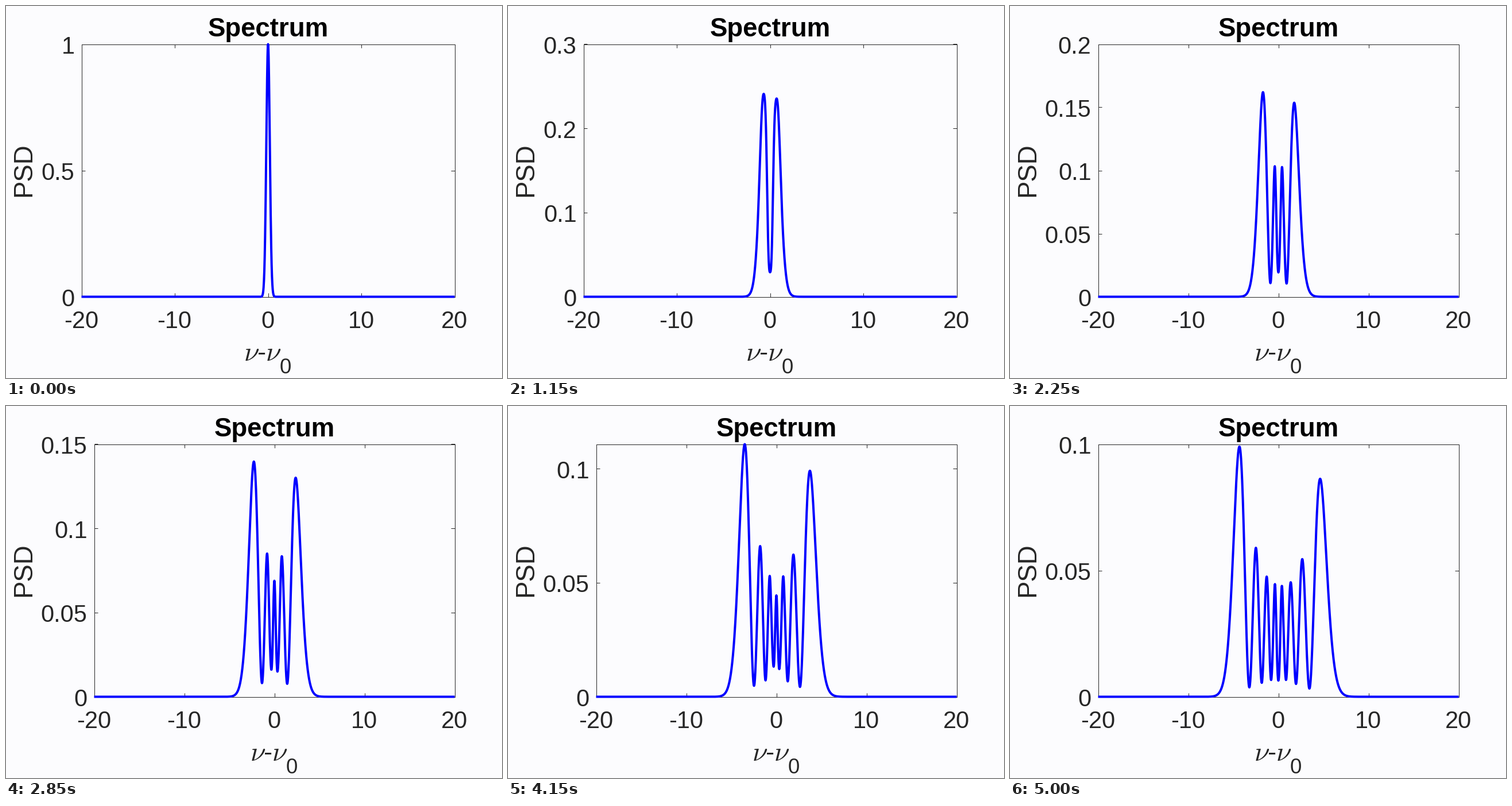
A matplotlib script for the animation above (5.05 s loop, 864 by 648 pixels).

```python
import math
import numpy as np
import matplotlib.pyplot as plt
from matplotlib.animation import FuncAnimation

W, H, DPI = 864, 648, 100
FRAMES, INTERVAL = 101, 50
RIGHT, TOP, BOTTOM = 781.5, 66.5, 506.5
TICK = 6.5
BG, INK, BLUE = "#fcfcfe", "#262626", "#0000ff"
SMALL, BIG = 41.5, 45.7          # font sizes in pixels

# Self-phase modulation of a Gaussian pulse with self-steepening
PHASE_MAX = 23.7                 # peak nonlinear phase at the last step
NU0 = 281.8                      # carrier frequency, THz (pulse FWHM 1 ps)
N, SPAN, SUBSTEPS = 4096, 50.0, 6


def spectra():
    """PSD after each step of propagation, relative to the input peak."""
    t = (np.arange(N) - N // 2) * SPAN / N
    nu = np.fft.fftfreq(N, SPAN / N)
    gain = 1j * (1 + nu / NU0)

    def slope(a):
        field = np.fft.fft(a)
        return gain * np.fft.ifft(np.abs(field) ** 2 * field)

    a = np.fft.ifft(np.exp(-2 * math.log(2) * t ** 2))
    peak = np.max(np.abs(a) ** 2)
    h = PHASE_MAX / (FRAMES - 1) / SUBSTEPS
    order = np.argsort(nu)
    order = order[np.abs(nu[order]) <= 20 + 1e-9]
    rows = []
    for _ in range(FRAMES):
        rows.append(np.abs(a[order]) ** 2 / peak)
        for _ in range(SUBSTEPS):
            k1 = slope(a)
            k2 = slope(a + h / 2 * k1)
            k3 = slope(a + h / 2 * k2)
            k4 = slope(a + h * k3)
            a = a + h / 6 * (k1 + 2 * k2 + 2 * k3 + k4)
    return nu[order], rows


def y_scale(top):
    """Tick step and upper limit: next tick, or tight if that wastes over 20 %."""
    decade = 10.0 ** math.floor(math.log10(top) - 1)
    steps = [m * decade for m in (1, 2, 5, 10, 20, 50)]
    step = next(s for s in steps if top / s <= 4 + 1e-9)
    limit = step * math.ceil(top / step - 1e-9)
    if (limit - top) / limit > 0.2:
        limit = top
    return step, limit


nu, psd = spectra()

fig = plt.figure(figsize=(W / DPI, H / DPI), dpi=DPI, facecolor=BG)
ax = fig.add_axes([0, 0, 1, 1])
ax.set_xlim(0, W)
ax.set_ylim(H, 0)
ax.axis("off")


def px(n):
    return n * 72 / DPI


def label(s, x, y, size=SMALL, color=INK, ha="center", **kw):
    return ax.text(x, y, s, fontsize=px(size), color=color, ha=ha,
                   va="baseline", family="Liberation Sans", **kw)


frame_line, = ax.plot([], [], color=INK, lw=px(1), zorder=2,
                      solid_joinstyle="miter")
tick_line, = ax.plot([], [], color=INK, lw=px(1), zorder=2,
                     solid_capstyle="butt")
curve, = ax.plot([], [], color=BLUE, lw=px(4), zorder=3,
                 solid_joinstyle="round", solid_capstyle="butt")

label("PSD", 43, 285, BIG, rotation=90, rotation_mode="anchor")
title = label("Spectrum", 0, 53, BIG, "black", weight="bold")
x_labels = [(v, label(str(v), 0, 561)) for v in range(-20, 21, 10)]
y_labels = [label("", 0, 0, ha="right") for _ in range(6)]
axis_name = [
    (-29, label(r"$\nu$", 0, 618, 48, math_fontfamily="cm")),
    (-10.5, label("-", 0, 618, BIG)),
    (9.5, label(r"$\nu$", 0, 618, 48, math_fontfamily="cm")),
    (30, label("0", 0, 640, 0.8 * BIG)),
]


def draw(i):
    step, limit = y_scale(psd[i].max())
    left = 153.5 if step < 0.09 else 131.5
    mid = (left + RIGHT) / 2

    def to_x(v):
        return mid + v * (RIGHT - left) / 40

    def to_y(v):
        return BOTTOM - v * (BOTTOM - TOP) / limit

    frame_line.set_data([left, RIGHT, RIGHT, left, left],
                        [BOTTOM, BOTTOM, TOP, TOP, BOTTOM])
    curve.set_data(to_x(nu), to_y(psd[i]))

    tx, ty = [], []

    def tick(x0, y0, dx, dy):
        tx.extend([x0, x0 + dx, np.nan])
        ty.extend([y0, y0 + dy, np.nan])

    for v, text in x_labels:
        text.set_x(to_x(v) - 0.5)
        tick(to_x(v), BOTTOM, 0, -TICK)
        tick(to_x(v), TOP, 0, TICK)

    count = int(limit / step + 1e-9) + 1
    for k, text in enumerate(y_labels):
        text.set_visible(k < count)
        if k < count:
            y = to_y(k * step)
            text.set_text(f"{k * step:.4g}")
            text.set_position((left - 12, y + 16.5))
            tick(left, y, TICK, 0)
            tick(RIGHT, y, -TICK, 0)
    tick_line.set_data(tx, ty)

    title.set_x(mid + 0.5)
    for dx, text in axis_name:
        text.set_x(mid + dx)
    return []


anim = FuncAnimation(fig, draw, frames=FRAMES, interval=INTERVAL,
                     repeat=True, repeat_delay=0, blit=False)
plt.show()
```
